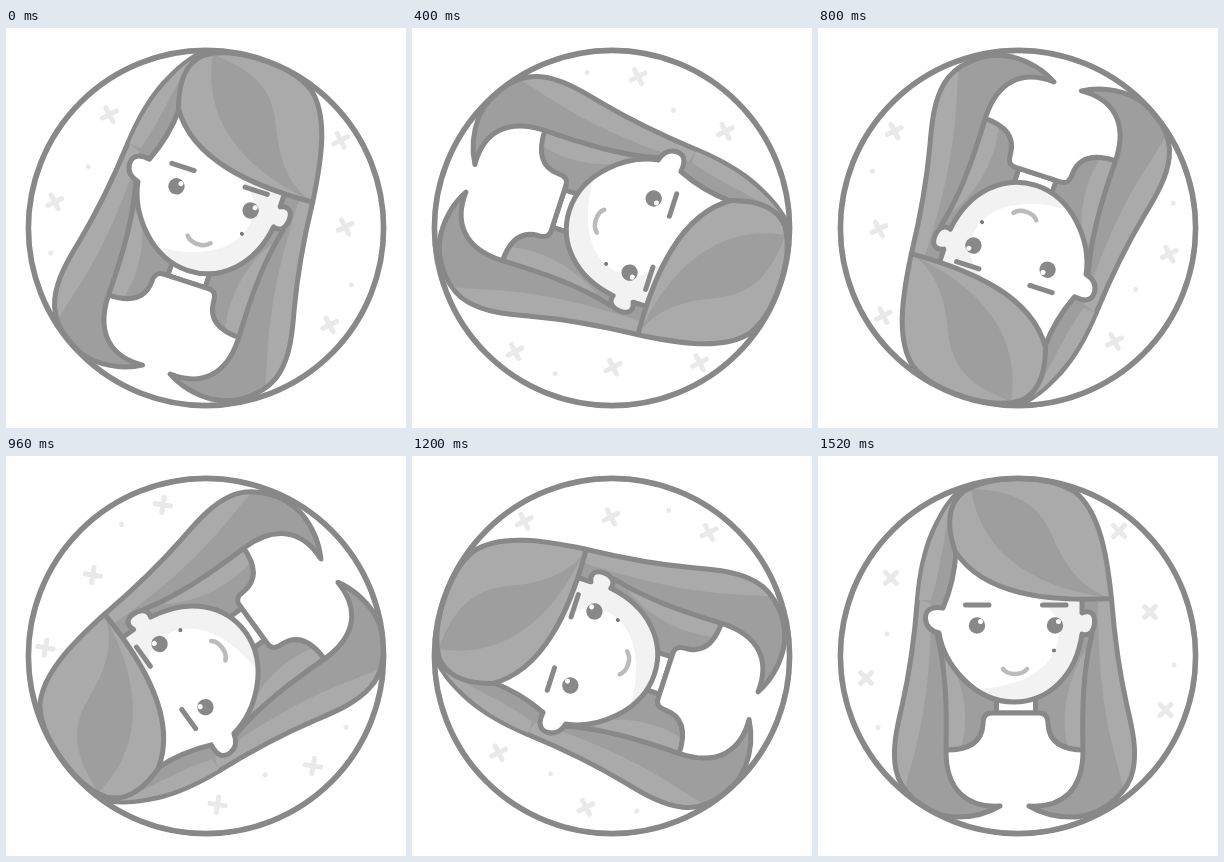
Recreate the animation shown at these times as an HTML page. Size 400 by 400 pixels, loop 1.6 s.

```html
<!DOCTYPE html>
<html lang="en">
<head>
<meta charset="utf-8">
<title>Spinning portrait</title>
<style>
  html, body { margin: 0; height: 100%; overflow: hidden; background: #fefefe; }
  svg { display: block; width: 100vw; height: 100vh; }
  .line { stroke: #888; stroke-width: 5; stroke-linecap: round; stroke-linejoin: round; }
  .rim { stroke-width: 5.6; }
  .dark { fill: #9e9e9e; }
  .light { fill: #aaa; }
  .white { fill: #fff; }
  .none { fill: none; }
</style>
</head>
<body>
<svg viewBox="0 0 400 400">
  <defs>
    <clipPath id="disc"><circle cx="200" cy="200" r="177.600"/></clipPath>
    <path id="face" d="M138 95C137 118 131 138 125 152C112 150 107 155 107.500 163C108 171 113 175 121 177
      C126 208 156 246 196 246C230 246 258 220 264 178C272 181 277 174 276.500 164C276 156 270 154 264 157V140Z"/>
    <clipPath id="inFace"><use href="#face"/></clipPath>
    <path id="bangs" d="M137 95C130 74 128 50 145 36C170 20 225 16 257 36C282 56 289 100 293.500 142.500C230 146 165 139 137 95Z"/>
    <path id="lockShape" d="M99.500 143C97 175 92 215 84 250C78 275 74 295 78 314C82 334 104 358 135 361
      C155 362 170 357 182 350C150 352 128 335 128 295C129 250 128 215 119 178"/>
    <g id="lock">
      <use href="#lockShape" class="dark"/>
      <path class="light" d="M99.500 143C97 175 92 215 84 250C78 275 74 295 78 314Q80 326 87 336C92 305 114 262 113 143Z"/>
      <use href="#lockShape" class="line none"/>
    </g>
    <g id="eye">
      <circle r="8.200" fill="#888"/>
      <circle cx="3.500" cy="-4" r="2.500" class="white"/>
    </g>
  </defs>
  <circle cx="200" cy="200" r="177.600" class="white"/>
  <g clip-path="url(#disc)">
    <g id="girl">
      <g id="confetti" stroke="#e9e9e9" stroke-width="5" stroke-linecap="round"></g>

      <path class="dark" d="M110 140H291L294 190L268 235V292H128V235L100 190Z"/>
      <path class="light" d="M128 200C150 230 150 270 143 292H128ZM267 195C243 235 245 270 250 292H267Z"/>
      <path class="line white" d="M178.500 240V257H217.500V240"/>
      <path class="line white" d="M128 294C150 294 164 287 165 268C165 260 168 257 174 257H221
        C227 257 230 260 230 268C231 287 245 294 267 294"/>
      <use href="#lock"/>
      <use href="#lock" transform="matrix(-1 0 0 1 393 0)"/>

      <path class="line dark" d="M99.500 143C101 125 105 98 114.500 76C122 60 132 40 150 28L138 95C137 118 131 138 125 152"/>
      <path class="light" d="M101 144C103 122 107 98 116.500 77C121 66 127 54 134 45C126 75 124 110 113 144Z"/>

      <use href="#face" class="white"/>
      <path clip-path="url(#inFace)" fill="#f2f2f2" d="M138 98C190 135 237 138 241 172C243 212 200 238 135 232V260H290V90Z"/>
      <use href="#face" class="line none"/>

      <use href="#bangs" class="light"/>
      <path class="dark" d="M153 33C218 35 228 65 240 92C252 116 266 132 288 141C240 135 165 112 153 33Z"/>
      <use href="#bangs" class="line none"/>

      <path class="line" d="M147.500 149H171M224.500 149H248"/>
      <use href="#eye" x="159" y="169.500"/>
      <use href="#eye" x="237" y="169.500"/>
      <circle cx="236" cy="194.500" r="2" fill="#777"/>
      <path class="none" stroke="#bbb" stroke-width="4.500" stroke-linecap="round" d="M185 213C190 219.500 204 219.500 209 213"/>
    </g>
  </g>
  <circle cx="200" cy="200" r="177.600" class="line rim none"/>
</svg>
<script>
  const girl = document.getElementById('girl');
  const crosses = [[73, 122], [48, 222], [301, 75], [332, 156], [347.5, 254]];
  const dots = [[69, 178], [60, 271.5], [356, 209]];
  const cross = ([x, y]) => `<path d="M${x - 5.5} ${y - 5.5}l11 11m0-11l-11 11"/>`;
  const dot = ([x, y]) => `<path d="M${x} ${y}h.01"/>`;
  document.getElementById('confetti').innerHTML = crosses.map(cross).join('') + dots.map(dot).join('');

  const STEP = 80, STEPS = 20;
  const start = performance.now();

  // One clockwise turn in 20 equal hard steps.
  function draw(now) {
    const step = Math.floor(Math.max(0, now - start) / STEP) % STEPS;
    girl.setAttribute('transform', `rotate(${(step + 1) * 360 / STEPS} 200 200)`);
    requestAnimationFrame(draw);
  }
  draw(start);
</script>
</body>
</html>
```
